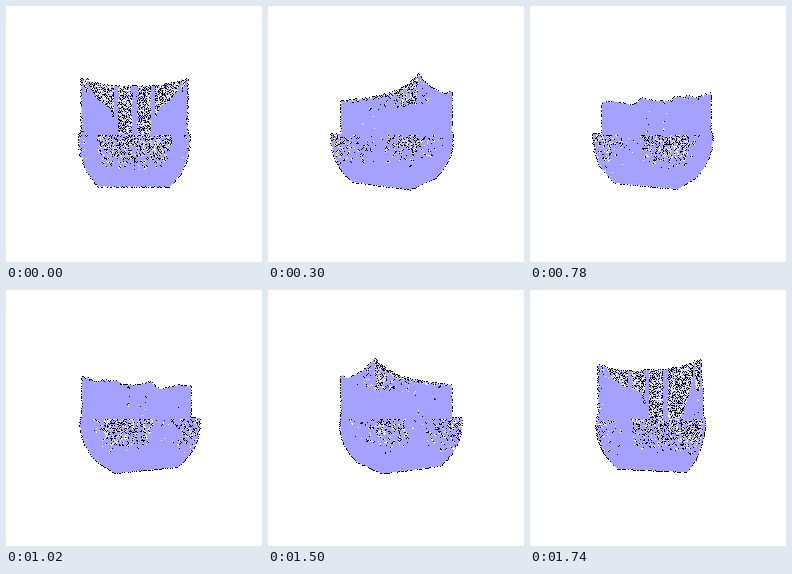
These frames come from a looping animation (256 px wide and 256 px high, 1800 ms). An HTML page with a canvas:

```html
<!DOCTYPE html>
<html lang="en">
<head>
<meta charset="utf-8">
<title>Turning point cloud</title>
<style>
  html, body { margin: 0; width: 100%; height: 100%; overflow: hidden; background: #fff; }
  canvas { display: block; width: 256px; height: 256px; image-rendering: pixelated; }
</style>
</head>
<body>
<canvas id="stage" width="256" height="256"></canvas>
<script>
const SIZE = 256, MID = 128, FOCAL = 233;
const STEPS = 30, STEP_MS = 60;
const BACK = 43.5, FRONT = -34, HALF = 42.5, RIM = 45, FLOOR = 31, DEPTH = 44.7;

const ctx = document.getElementById('stage').getContext('2d');
const image = ctx.createImageData(SIZE, SIZE);
const pixels = new Uint32Array(image.data.buffer);
const WHITE = 0xffffffff, BLACK = 0xff000000, LAVENDER = 0xffffa2a5;

let seed = 7;
function random() {
  seed = (seed * 1664525 + 1013904223) >>> 0;
  return seed / 4294967296;
}

const points = [];

// Samples a patch on a slightly uneven grid; place(u, v) returns [x, height, z].
function patch(width, height, gap, place) {
  const cols = Math.round(width / gap), rows = Math.round(height / gap);
  for (let i = 0; i <= cols; i++) {
    for (let j = 0; j <= rows; j++) {
      const jitter = n => Math.min(1, Math.max(0, n));
      const u = jitter((i + (random() - 0.5) * 0.5) / cols);
      const v = jitter((j + (random() - 0.5) * 0.5) / rows);
      points.push(place(u, v));
    }
  }
}

const mix = (a, b, t) => a + (b - a) * t;
const backTop = x => 39 + 6 * Math.pow(Math.max(0, Math.abs(x) - 15) / 28, 1.5);
const sideTop = z => 30 + 15 * Math.exp((z - BACK) / 16);

function buildUpper() {
  patch(86, 41, 1.42, (u, v) => {
    const x = mix(-43, 43, u);
    return [x, v * backTop(x), BACK];
  });
  for (const x of [-15, 0, 15]) {
    patch(2.6, 39, 0.75, (u, v) => [x + (u - 0.5) * 2.6, v * 39, BACK]);
  }
  for (const side of [-1, 1]) {
    patch(78, 33, 1.42, (u, v) => {
      const z = mix(BACK, FRONT, u);
      return [side * HALF, v * sideTop(z), z];
    });
    // Inner face of the arm, leaning inwards towards the front.
    patch(78, 33, 1.4, (u, v) => {
      const z = mix(BACK, FRONT, u);
      return [side * (38 - u * (9 + 8 * (1 - v))), v * sideTop(z), z];
    });
    patch(17, 30, 1.2, (u, v) => [side * mix(HALF, 21 + 8 * v, u), v * 30, FRONT]);
  }
}

function buildLower() {
  for (let turn = 0; turn < 4; turn++) {
    patch(86, 52, 1.75, (u, v) => {
      const t = 1 - Math.pow(1 - v, 1.5);
      const w = FLOOR + (RIM - FLOOR) * (1 - Math.pow(t, 2.5));
      const along = mix(-w, w, u), out = turn % 2 ? w : -w;
      const [x, z] = turn < 2 ? [along, out] : [out, along];
      return [x, -t * DEPTH, z * 0.975];
    });
  }
  patch(62, 62, 1.1, (u, v) => [mix(-FLOOR, FLOOR, u), -DEPTH, mix(-FLOOR, FLOOR, v)]);
  patch(90, 87, 2, (u, v) => [mix(-RIM, RIM, u), 0, mix(-44, 43.5, v)]);
}

function speck(i, step) {
  let n = Math.imul(i + 1, 374761393) ^ Math.imul(step + 1, 668265263);
  n = Math.imul(n ^ (n >>> 13), 1274126177);
  return ((n ^ (n >>> 16)) >>> 0) / 4294967296;
}

const AROUND = [-1, 1, -SIZE, SIZE, -SIZE - 1, -SIZE + 1, SIZE - 1, SIZE + 1];

function draw(step) {
  const angle = step / STEPS * Math.PI * 2;
  const cos = Math.cos(angle), sin = Math.sin(angle);
  const hit = new Uint8Array(SIZE * SIZE);
  for (const [x, h, z] of points) {
    const scale = FOCAL / (FOCAL - z * cos + x * sin);
    const px = Math.round(MID + (x * cos + z * sin) * scale);
    const py = Math.round(MID - h * scale);
    hit[py * SIZE + px] = 1;
  }
  pixels.fill(WHITE);
  for (let y = 40; y < 210; y++) {
    for (let x = 40; x < 216; x++) {
      const i = y * SIZE + x;
      let near = 0;
      for (const offset of AROUND) near += hit[i + offset];
      // Close gaps in dense areas; sparse ones and outlines get dark specks.
      if (hit[i] || near > 5) {
        pixels[i] = LAVENDER;
      } else {
        const beside = hit[i - 1] + hit[i + 1] + hit[i - SIZE] + hit[i + SIZE];
        if (beside && speck(i, step) < 0.55) pixels[i] = BLACK;
      }
    }
  }
  ctx.putImageData(image, 0, 0);
}

buildUpper();
buildLower();

const start = performance.now();
let shown = -1;
function tick() {
  const step = Math.floor((performance.now() - start) / STEP_MS) % STEPS;
  if (step !== shown) draw(shown = step);
  requestAnimationFrame(tick);
}
tick();
</script>
</body>
</html>
```
